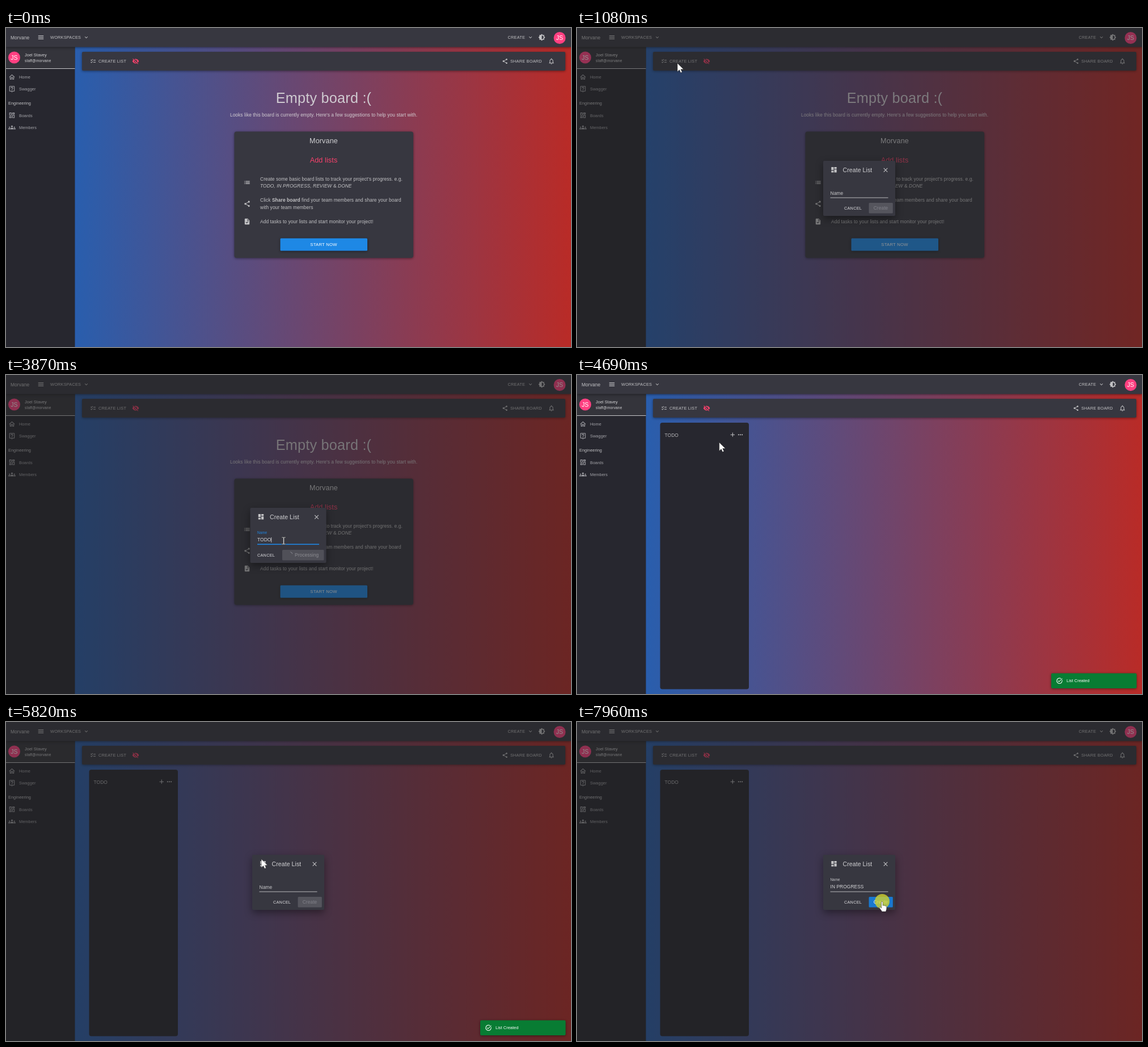
An HTML page that plays this animation: 996 px wide and 562 px high, repeating every 8 s.

```html
<!DOCTYPE html>
<html lang="en">
<head>
<meta charset="utf-8">
<title>Board</title>
<style>
html, body { margin: 0; width: 100%; height: 100%; overflow: hidden; background: #27272f; }
svg { display: block; width: 100%; height: 100%; font-family: "Liberation Sans", Arial, sans-serif; }
text { white-space: pre; letter-spacing: .0094em; }
.btn { letter-spacing: .0286em; }
.mid { text-anchor: middle; }
.shadow { filter: drop-shadow(0 1px 2px rgba(0,0,0,.45)); }
.deep { filter: drop-shadow(0 5px 7px rgba(0,0,0,.4)); }
</style>
</head>
<body>
<svg viewBox="0 0 996 562">
  <defs>
    <linearGradient id="sky" gradientUnits="userSpaceOnUse" x1="0" x2="996">
      <stop stop-color="#1565c0"/><stop offset="1" stop-color="#b92b27"/>
    </linearGradient>
  </defs>
  <rect width="996" height="562" fill="url(#sky)"/>
  <g id="empty"></g>
  <g id="list"></g>
  <g id="frame"></g>
  <rect id="shade" width="996" height="562" fill="#212121"/>
  <g id="dialog"></g>
  <g id="toast"></g>
  <circle id="click" r="13" fill="#d0d22e" opacity=".8"/>
  <path id="cursor" fill="#fff" stroke="#222" stroke-width=".5"/>
</svg>
<script>
const $ = id => document.getElementById(id);
const TEXT = '#c3c3c5', DIM = '#a3a3a8', PINK = '#ff4081', RED = '#f8416b', BLUE = '#1e88e5', PANEL = '#373740', DARK = '#27272f';
const BODY = 8.38, SMALL = 7.35;

const icons = {
  checks: 'M22 7h-9v2h9zM22 15h-9v2h9zM5.54 11L2 7.46l1.41-1.41 2.12 2.12 4.24-4.24 1.41 1.41zM5.54 19L2 15.46l1.41-1.41 2.12 2.12 4.24-4.24 1.41 1.41z',
  hidden: 'M12 7c2.76 0 5 2.24 5 5 0 .65-.13 1.26-.36 1.83l2.92 2.92c1.51-1.26 2.7-2.89 3.43-4.75-1.73-4.39-6-7.5-11-7.5-1.4 0-2.74.25-3.98.7l2.16 2.16C10.74 7.13 11.35 7 12 7zM2 4.27l2.74 2.74C3.08 8.3 1.78 10.02 1 12c1.73 4.39 6 7.5 11 7.5 1.55 0 3.03-.3 4.38-.84L19.73 22 21 20.73 3.27 3zM7.53 9.8l1.55 1.55c-.05.21-.08.43-.08.65 0 1.66 1.34 3 3 3 .22 0 .44-.03.65-.08l1.55 1.55c-.67.33-1.41.53-2.2.53-2.76 0-5-2.24-5-5 0-.79.2-1.53.53-2.2zm4.31-.78l3.15 3.15.02-.16c0-1.66-1.34-3-3-3z',
  share: 'M18 16.08c-.76 0-1.44.3-1.96.77L8.91 12.7c.05-.23.09-.46.09-.7s-.04-.47-.09-.7l7.05-4.11c.54.5 1.25.81 2.04.81 1.66 0 3-1.34 3-3s-1.34-3-3-3-3 1.34-3 3c0 .24.04.47.09.7L8.04 9.81C7.5 9.31 6.79 9 6 9c-1.66 0-3 1.34-3 3s1.34 3 3 3c.79 0 1.5-.31 2.04-.81l7.12 4.16c-.05.21-.08.43-.08.65 0 1.61 1.31 2.92 2.92 2.92s2.92-1.31 2.92-2.92-1.31-2.92-2.92-2.92z',
  bell: 'M12 22c1.1 0 2-.9 2-2h-4c0 1.1.9 2 2 2zm6-6v-5c0-3.07-1.63-5.64-4.5-6.32V4a1.5 1.5 0 0 0-3 0v.68C7.64 5.36 6 7.92 6 11v5l-2 2v1h16v-1zm-2 1H8v-6c0-2.48 1.51-4.5 4-4.5s4 2.02 4 4.5z',
  menu: 'M3 18h18v-2H3zm0-5h18v-2H3zm0-7v2h18V6z',
  down: 'M16.59 8.59L12 13.17 7.41 8.59 6 10l6 6 6-6z',
  theme: 'M20 15.31L23.31 12 20 8.69V4h-4.69L12 .69 8.69 4H4v4.69L.69 12 4 15.31V20h4.69L12 23.31 15.31 20H20zM12 18V6a6 6 0 0 1 0 12z',
  home: 'M12 5.69l5 4.5V18h-2v-6H9v6H7v-7.81zM12 3L2 12h3v8h6v-6h2v6h6v-8h3z',
  help: 'M19 2H5a2 2 0 0 0-2 2v14a2 2 0 0 0 2 2h4l3 3 3-3h4a2 2 0 0 0 2-2V4a2 2 0 0 0-2-2zm0 16h-4.83L12 20.17 9.83 18H5V4h14zm-8-3h2v2h-2zm1-8c1.1 0 2 .9 2 2 0 2-3 1.75-3 5h2c0-2.25 3-2.5 3-5a4 4 0 0 0-8 0h2c0-1.1.9-2 2-2z',
  grid: 'M19 5v2h-4V5zM9 5v6H5V5zM19 13v6h-4v-6zM9 17v2H5v-2zM21 3h-8v6h8zM11 3H3v10h8zM21 11h-8v10h8zM11 15H3v6h8z',
  tiles: 'M3 13h8V3H3zm0 8h8v-6H3zm10 0h8V11h-8zm0-18v6h8V3z',
  people: 'M4 13a2 2 0 1 0 0-4 2 2 0 1 0 0 4zM20 13a2 2 0 1 0 0-4 2 2 0 1 0 0 4zM12 11a3 3 0 1 0 0-6 3 3 0 1 0 0 6zM6 18v-2c0-4 12-4 12 0v2zM0 18v-2c0-1.5 2-2.3 5-2v4zM24 18v-2c0-1.5-2-2.3-5-2v4z',
  lines: 'M3 13h2v-2H3zm0 4h2v-2H3zm0-8h2V7H3zm4 4h14v-2H7zm0 4h14v-2H7zM7 7v2h14V7z',
  task: 'M14 2H6a2 2 0 0 0-2 2v16a2 2 0 0 0 2 2h12a2 2 0 0 0 2-2V8zm-3.06 16L7.4 14.46l1.41-1.41 2.12 2.12 4.24-4.24 1.41 1.41zM13 9V3.5L18.5 9z',
  close: 'M19 6.41L17.59 5 12 10.59 6.41 5 5 6.41 10.59 12 5 17.59 6.41 19 12 13.41 17.59 19 19 17.59 13.41 12z',
  plus: 'M19 13h-6v6h-2v-6H5v-2h6V5h2v6h6z',
  more: 'M4 12a2 2 0 1 0 4 0 2 2 0 1 0-4 0zM10 12a2 2 0 1 0 4 0 2 2 0 1 0-4 0zM16 12a2 2 0 1 0 4 0 2 2 0 1 0-4 0z',
  done: 'M22 5.18L10.59 16.6l-4.24-4.24 1.41-1.41 2.83 2.83 10-10zm-2.21 5.04c.13.57.21 1.17.21 1.78a8 8 0 1 1-3.72-6.75l1.44-1.44A10 10 0 1 0 21.4 8.61z'
};

const cursors = {
  arrow: 'M0 0V15l3.5-3.3 2.3 5.1 2.5-1.1-2.3-5h4.8z',
  hand: 'M-1.5.5C-1.5-1 1-1 1 .5V6.500c1-.8 2.200-.6 2.500.3 1-.6 2-.3 2.300.5 1-.3 2 .2 2 1.300V12c0 2-1.300 3-1.300 5H-.5c-.5-2-3-4-4.300-6.500-.6-1.300.8-2.200 1.800-1.200L-1.500 11z',
  beam: 'M-3.500-6.500h2.700l.8.5.8-.5h2.700v1.200H.8v10.600h2.700v1.200H.8L0 6l-.8.500h-2.700V5.300h2.700V-5.300h-2.700z'
};

const icon = (name, x, y, color = TEXT, s = .525) =>
  `<path d="${icons[name]}" fill="${color}" fill-rule="evenodd" transform="translate(${x} ${y}) scale(${s}) translate(-12 -12)"/>`;
const text = (x, y, size, str, color = TEXT, cls = '') =>
  `<text x="${x}" y="${y}" font-size="${size}" fill="${color}" class="${cls}">${str}</text>`;
const rect = (x, y, w, h, color, r = 0, cls = '') =>
  `<rect x="${x}" y="${y}" width="${w}" height="${h}" rx="${r}" fill="${color}" class="${cls}"/>`;
const avatar = (x, y) =>
  `<circle cx="${x}" cy="${y}" r="10.5" fill="${PINK}"/>` + text(x, y + 3.8, 10.5, 'JS', '#fff', 'mid');

$('frame').innerHTML =
  rect(134, 42, 852, 33, PANEL, 2, 'shadow') +
  icon('checks', 153.5, 58.5, TEXT, .45) + text(163, 61, SMALL, 'CREATE LIST', TEXT, 'btn') +
  icon('hidden', 228.5, 58.5, RED) +
  icon('share', 879.7, 58.5, TEXT, .46) + text(889, 61, SMALL, 'SHARE BOARD', TEXT, 'btn') +
  icon('bell', 961.5, 58.5) +
  rect(0, 33, 121.5, 529, DARK) + rect(0, 33, 121.5, 38, '#34343b') + rect(0, 71, 121.5, 1, '#c8c8ca') +
  avatar(14.5, 52) + text(33, 49.6, SMALL, 'Joel Stavey', '#d4d4d6') + text(33, 60.2, 6.5, 'staff@morvane', '#d4d4d6', 'btn') +
  [['home', 86.5, 'Home'], ['help', 107.5, 'Swagger'], ['grid', 153.8, 'Boards'], ['people', 175.3, 'Members']]
    .map(([name, y, label]) => icon(name, 10.5, y, DIM) + text(23, y + 2.9, SMALL, label, DIM)).join('') +
  text(4, 134.700, SMALL, 'Engineering', TEXT) +
  rect(0, 0, 996, 33.5, PANEL, 0, 'shadow') +
  text(8, 19.600, BODY, 'Morvane') + icon('menu', 61.5, 16.500) +
  text(78, 19.200, SMALL, 'WORKSPACES', TEXT, 'btn') + icon('down', 141.500, 16.500, TEXT, .45) +
  text(884.500, 19.200, SMALL, 'CREATE', TEXT, 'btn') + icon('down', 924.500, 16.500, TEXT, .45) +
  icon('theme', 944.500, 16.500) + avatar(976, 17.500);

$('empty').innerHTML =
  text(560, 132, 25.200, 'Empty board :(', '#cfcad0', 'mid') +
  text(560, 156, BODY, "Looks like this board is currently empty. Here's a few suggestions to help you start with.", '#d2cdd2', 'mid') +
  rect(402.500, 182.500, 315.500, 222.500, PANEL, 4, 'shadow') +
  text(560, 203.200, 12.600, 'Morvane', '#cfcfd1', 'mid') + text(560, 236.500, 12.600, 'Add lists', RED, 'mid') +
  icon('lines', 425, 272) + icon('share', 425, 309.800) + icon('task', 425, 341) +
  text(448, 269, BODY, "Create some basic board lists to track your project's progress. e.g.") +
  text(448, 281.200, BODY, '<tspan font-style="italic">TODO, IN PROGRESS, REVIEW</tspan> &amp; <tspan font-style="italic">DONE</tspan>') +
  text(448, 306.300, BODY, 'Click <tspan font-weight="bold">Share board</tspan> find your team members and share your board') +
  text(448, 318.700, BODY, 'with your team members') +
  text(448, 344, BODY, 'Add tasks to your lists and start monitor your project!') +
  rect(483.500, 370.500, 153.500, 22, BLUE, 1.500, 'shadow') + text(560, 384.200, 7.700, 'START NOW', '#fff', 'btn mid');

$('list').innerHTML = rect(146.500, 84, 156.500, 469.500, DARK, 4) +
  text(154.500, 108.600, BODY, 'TODO', '#b4b4b7') + icon('plus', 274.300, 105.200) + icon('more', 288, 105.200);

$('toast').innerHTML = rect(836, 525.500, 150.500, 26.500, '#087c33', 2, 'shadow') +
  icon('done', 850.500, 538.700, '#fff') + text(863, 541.300, SMALL, 'List Created', '#fff');

const pen = document.createElement('canvas').getContext('2d');
pen.font = BODY + 'px "Liberation Sans", Arial, sans-serif';
const clamp = v => Math.max(0, Math.min(1, v));
const mix = (a, b, p) => a + (b - a) * p;

// Times at which each dialog opens, gains focus, gets its keys, loses focus, submits and closes.
const dialogs = [
  { open: 920, focus: 2000, word: 'TODO', keys: [3360, 3420, 3570, 3620], blur: 9000, send: 3820, close: 3970 },
  { open: 5450, focus: 5960, word: 'IN PROGRESS', keys: [...'IN PROGRESS'].map((_, i) => 6150 + i * 52), blur: 7450, send: 9000, close: 9000 }
];

function dialogMarkup(t, d) {
  const busy = t >= d.send, grow = busy ? 3.500 : 0, left = 446.500 - grow;
  const focused = t >= d.focus && t < d.blur, ready = t >= d.blur;
  const typed = d.keys.filter(k => k <= t), value = d.word.slice(0, typed.length);
  const lift = clamp((t - d.focus) / 180);
  const scale = Math.sin(clamp((t - d.open) / 100) * Math.PI / 2);
  const last = typed.length ? typed[typed.length - 1] : d.focus;
  const caretX = left + pen.measureText(value).width + value.length * BODY * .0094;

  let s = rect(434 - grow, 234, 127 + 2 * grow, 97, PANEL, 2, 'deep') +
    icon('tiles', 453 - grow, 249.800) + text(468.500 - grow, 253.800, 10.500, 'Create List', '#d0d0d2') +
    icon('close', 544 + grow, 250.200) +
    text(left, mix(293.800, 280.400, lift), mix(BODY, 6.300, lift), 'Name', focused ? BLUE : '#c8c8ca') +
    text(left, 293.200, BODY, value, '#d4d4d6') +
    (focused ? rect(left, 297.500, 102 + 2 * grow, 1.600, BLUE) : rect(left, 298.500, 102, 1, '#b9b9bc'));
  if (focused && (t - last) % 1010 < 505) s += rect(caretX, 286, .8, 9, '#e4e4e6');

  s += text(busy ? 443 : 471, 319.700, SMALL, 'CANCEL', '#dcdcde', 'btn');
  if (busy) {
    const p = t - d.send;
    s += rect(487, 308, 73.500, 18.500, '#505058', 1.500) + text(509, 320, BODY, 'Processing', '#8c8c92') +
      `<circle cx="500" cy="316.500" r="5" fill="none" stroke="#8c8c92" stroke-dasharray="${1 + p * .08} 40" transform="rotate(${p * .25 - 90} 500 316.500)"/>`;
  } else {
    const fill = ready ? (t > 7800 ? '#1978d0' : BLUE) : '#55555d';
    s += rect(514.500, 308, 42.300, 18.500, fill, 1.500) + text(522.700, 320, BODY, 'Create', ready ? '#fff' : '#82828a');
  }
  return `<g opacity="${scale}" transform="translate(497.500 282.500) scale(${scale}) translate(-497.500 -282.500)">${s}</g>`;
}

// time, x, y and, where it changes, the pointer shape
const track = [
  [50, 806, 504, 'arrow'], [300, 470, 270], [550, 240, 105], [770, 180, 62, 'hand'],
  [920, 177, 62, 'arrow'], [1100, 177, 62], [1690, 430, 122], [1820, 565, 220], [1890, 545, 325], [1960, 489.500, 292, 'beam'],
  [3970, 489.500, 292, 'arrow'], [4380, 489, 291], [4500, 368, 201], [4690, 251, 119], [4920, 195, 72],
  [5150, 187, 66], [5200, 188, 67, 'hand'], [5450, 188, 67, 'arrow'], [5510, 224.500, 78], [5720, 410, 190],
  [5920, 489.500, 292, 'beam'], [6700, 489.500, 292, 'arrow'], [6830, 533, 301], [6950, 538, 318], [7150, 538, 318],
  [7380, 438, 258], [7520, 438, 258], [7780, 538, 317, 'hand'], [8000, 538, 317]
];
const clicks = [[770, 920, 180, 62], [1960, 2100, 489, 291], [5410, 5450, 188, 67], [5930, 6030, 489, 291], [7400, 7520, 438, 258], [7850, 8000, 538, 316]];

function movePointer(t) {
  const cursor = $('cursor');
  cursor.style.display = t < 50 ? 'none' : '';
  if (t >= 50) {
    const i = track.findIndex(k => k[0] > t), a = track[i - 1], b = track[i];
    const p = (t - a[0]) / (b[0] - a[0]);
    const shape = track.slice(0, i).reverse().find(k => k[3])[3];
    cursor.setAttribute('d', cursors[shape]);
    cursor.setAttribute('transform', `translate(${mix(a[1], b[1], p)} ${mix(a[2], b[2], p)})`);
  }
  const hit = clicks.find(c => t >= c[0] && t < c[1]);
  $('click').style.display = hit ? '' : 'none';
  if (hit) {
    $('click').setAttribute('cx', hit[2]);
    $('click').setAttribute('cy', hit[3]);
  }
}

function draw() {
  const t = performance.now() % 8000;
  const d = dialogs.find(d => t >= d.open && t < d.close);
  const created = t >= 3970;
  $('empty').style.display = created ? 'none' : '';
  $('list').style.display = created ? '' : 'none';
  $('shade').setAttribute('opacity', d ? .5 * clamp((t - d.open) / 170) : 0);
  $('dialog').innerHTML = d ? dialogMarkup(t, d) : '';
  $('toast').setAttribute('opacity', Math.min(clamp((t - 3970) / 160), clamp((7800 - t) / 760)));
  movePointer(t);
  requestAnimationFrame(draw);
}
draw();
</script>
</body>
</html>
```
